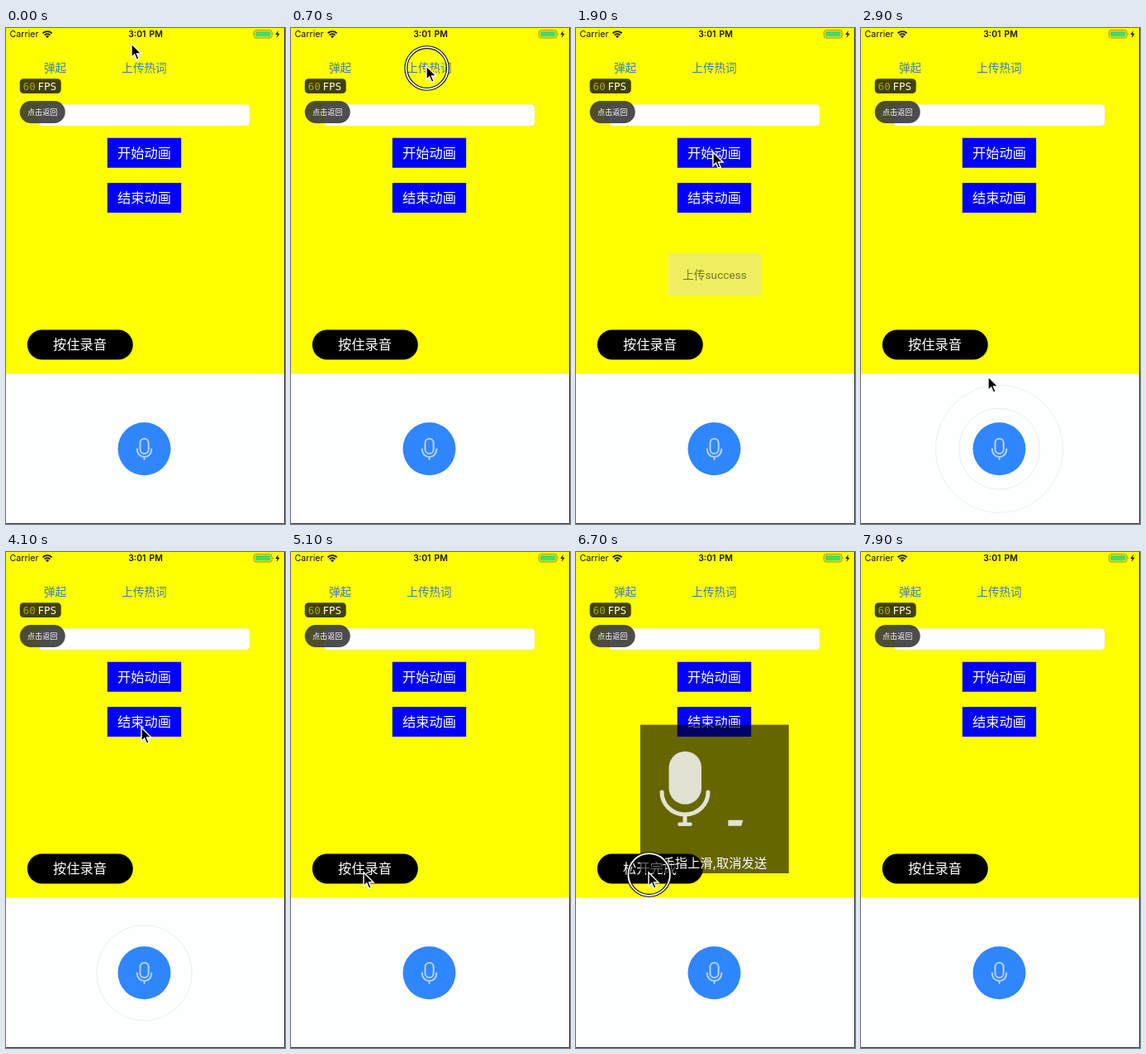
Write an HTML page that moves like this. It is 338x599 px and loops after 8000 ms.

```html
<!DOCTYPE html>
<html lang="zh">
<head>
<meta charset="utf-8">
<style>
html, body { margin: 0; width: 100%; height: 100%; overflow: hidden; background: #fdfefe; }
svg { display: block; width: 100vw; height: 100vh; }
text { font-family: Inter, "Noto Sans CJK SC", "Noto Sans CJK", sans-serif; font-size: 16.3px; fill: #fff; text-anchor: middle; }
.bar { font-size: 10.7px; fill: #111; }
.clock { font-size: 10.5px; font-weight: 600; word-spacing: 1.2px; }
.link { font-size: 13.6px; fill: #3f7cae; }
.fps { font: 12.6px "DejaVu Sans Mono", monospace; text-anchor: start; }
.line { fill: none; stroke-linecap: round; }
</style>
</head>
<body>
<svg viewBox="0 0 338 599" preserveAspectRatio="none">
  <rect width="338" height="599" fill="#fdfefe"/>
  <rect width="338" height="417.6" fill="#ff0"/>

  <!-- status bar -->
  <text class="bar" x="22" y="11.3">Carrier</text>
  <path d="M44.6 6.3a8 8 0 0 1 11 0M46.7 8.6a5 5 0 0 1 6.8 0" fill="none" stroke="#111" stroke-width="1.8"/>
  <path d="M50.1 12.2l-2-2.2a3 3 0 0 1 4 0z" fill="#111"/>
  <text class="bar clock" x="169" y="11.3">3:01 PM</text>
  <rect x="300.5" y="2.6" width="21.5" height="9.4" rx="2.4" fill="none" stroke="#8f8f28"/>
  <rect x="302" y="4.1" width="18.5" height="6.4" rx="1.2" fill="#4cd964"/>
  <path d="M323.3 5.6q1.6 1.7 0 3.4z" fill="#8f8f28"/>
  <path d="M330 3l-3.6 5h2.3l-.9 4 3.7-5.2h-2.4z" fill="#111"/>

  <!-- page -->
  <text class="link" x="59.5" y="52.5">弹起</text>
  <text class="link" x="167.5" y="52.5">上传热词</text>
  <rect x="16.7" y="61.2" width="50" height="17.8" rx="4.5" fill-opacity=".74"/>
  <text class="fps" x="20.6" y="74.8" style="fill:#a5a532">60</text>
  <text class="fps" x="38.4" y="74.8">FPS</text>
  <rect x="40" y="92.2" width="255.3" height="26" rx="4.5" fill="#fff" stroke="#e8e8a0" stroke-width=".6"/>
  <rect x="16.7" y="88" width="55" height="27" rx="13.5" fill="#3a3a3a" fill-opacity=".9"/>
  <text x="44.2" y="104.8" style="font-size:9.1px">点击返回</text>
  <path d="M122.8 132.8h89.4v35.9h-89.4zM122.800 187h89.400v35.900h-89.400z" fill="#00f"/>
  <text x="167.500" y="157">开始动画</text>
  <text x="167.500" y="211">结束动画</text>
  <rect x="25.800" y="364.500" width="128" height="36" rx="18"/>
  <text id="hold" x="89.600" y="388.300"></text>

  <!-- round microphone button -->
  <g id="rings" fill="none" stroke="#e7efed"></g>
  <circle cx="167.500" cy="508.300" r="32" fill="#3086ff"/>
  <g class="line" stroke="#b4d4ff" stroke-width="2">
    <rect x="162.500" y="496" width="10.200" height="18" rx="5.100"/>
    <path d="M158.900 508.500v.8a8.700 8.700 0 0 0 17.400 0v-.8M167.600 518.500v2.500"/>
  </g>

  <g id="toast">
    <rect x="111" y="272" width="114" height="52" rx="4.500" fill="#eeee60"/>
    <text x="168" y="303.200" style="font-family:Roboto,'Noto Sans CJK SC',sans-serif;font-size:13.700px;fill:#74742c">上传success</text>
  </g>

  <g id="hud">
    <rect x="77.800" y="208.600" width="180" height="179.400" fill-opacity=".6"/>
    <g fill="#e2e2d2">
      <rect x="112.500" y="240.700" width="39.500" height="64" rx="19.700"/>
      <path d="M129.500 316h5v10.500h4a2.200 2.200 0 0 1 0 4.500h-13a2.200 2.200 0 0 1 0-4.500h4z"/>
      <path id="level"/>
    </g>
    <path class="line" d="M104 290a28 27 0 0 0 56 0" stroke="#e2e2d2" stroke-width="5"/>
    <text x="167.800" y="380.700" style="font-size:15.300px">手指上滑,取消发送</text>
  </g>

  <!-- screen edge -->
  <path d="M337.500 0V598.500H0" fill="none" stroke="#333"/>

  <g id="cursor">
    <g id="press" fill="none">
      <circle r="25.300" cx=".6" cy="2.500" stroke="#111" stroke-width="4"/>
      <circle r="25.300" cx=".6" cy="2.500" stroke="#fff" stroke-width="1.700"/>
    </g>
    <path d="M0 0V16.500l3.700-3.500 2.700 6.300 2.800-1.200-2.700-6.100H12z" stroke="#fff" stroke-width="1.400"/>
  </g>
</svg>
<script>
const $ = id => document.getElementById(id);
const LOOP = 8000, STEP = 100;
const clamp = v => Math.max(0, Math.min(1, v));
const within = (t, a, b) => t >= a && t < b;
const show = (id, on) => $(id).setAttribute('visibility', on ? 'visible' : 'hidden');

// cursor stops: time, x, y
const stops = [
  [0, 152, 19], [400, 164, 46], [900, 164, 46], [1200, 220, 40], [1800, 166, 150],
  [2200, 166, 150], [2800, 154, 421], [3200, 154, 421], [3900, 164, 212],
  [4300, 164, 212], [4900, 88, 387], [7300, 88, 387], [7700, -30, 400], [8000, -30, 400]
];
const HOLD = [5300, 7200];
const presses = [[600, 800], [2000, 2200], [4200, 4300], HOLD];

const FIRST = 2067, GAP = 519, SPEED = 0.054, STOP = 4300;
const rings = Array.from({ length: 5 }, () => {
  const c = document.createElementNS('http://www.w3.org/2000/svg', 'circle');
  c.setAttribute('cx', 167.5);
  c.setAttribute('cy', 508.3);
  return $('rings').appendChild(c);
});

function place(t) {
  const i = stops.findIndex(s => s[0] > t);
  const [t0, x0, y0] = stops[i - 1], [t1, x1, y1] = stops[i];
  const k = (t - t0) / (t1 - t0), e = k * k * (3 - 2 * k);
  return [x0 + (x1 - x0) * e, y0 + (y1 - y0) * e];
}

function levelPath(t) {
  const wave = Math.sin((t - 6700) / 260) * Math.sin((t - 6700) / 410);
  const count = 1 + Math.floor(2.5 * Math.max(0, wave));
  let d = '';
  for (let i = 0; i < count; i++) d += `M184.3 ${323.7 - 14 * i}h${18 + 4 * i}l-2 7h${-16 - 4 * i}z`;
  return d;
}

function draw(t) {
  $('cursor').setAttribute('transform', `translate(${place(t)})`);
  show('press', presses.some(([a, b]) => within(t, a, b)));
  $('toast').setAttribute('opacity', Math.min(clamp((t - 700) / 300), clamp((2200 - t) / 300)));
  rings.forEach((c, i) => {
    const age = t - FIRST - i * GAP, r = 32 + Math.max(0, age) * SPEED;
    c.setAttribute('r', r);
    c.setAttribute('opacity', age > 0 && t < STOP ? clamp((86 - r) / 10) : 0);
  });
  const held = within(t, ...HOLD);
  $('hold').textContent = held ? '松开完成' : '按住录音';
  show('hud', held);
  $('level').setAttribute('d', levelPath(t));
}

function tick() {
  const t = performance.now() % LOOP;
  draw(Math.floor(t / STEP) * STEP);
  requestAnimationFrame(tick);
}
tick();
</script>
</body>
</html>
```
